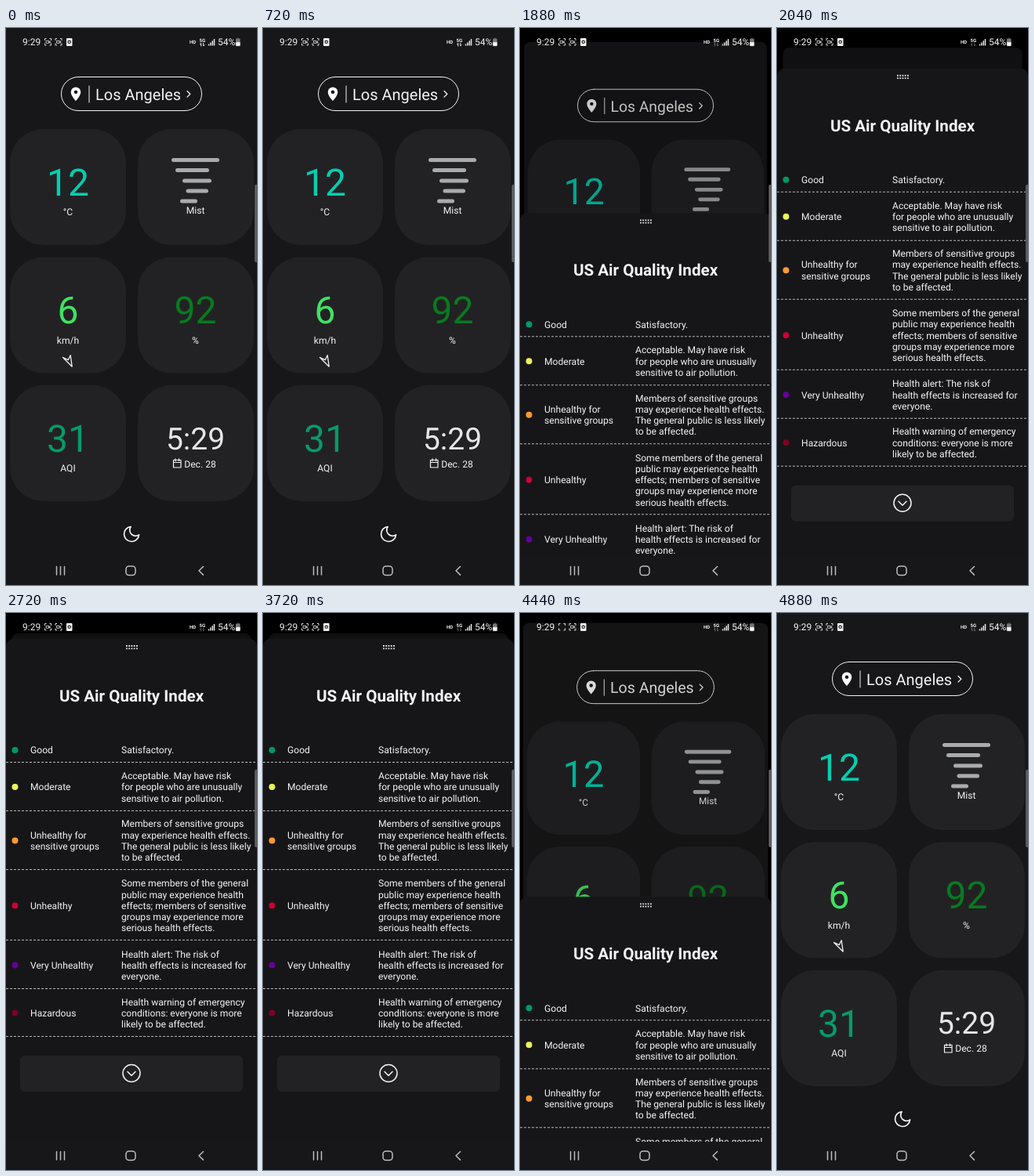
Animation of 320 by 711 pixels, one loop 5080 ms. Source, as an HTML page:

```html
<!DOCTYPE html>
<html lang="en">
<head>
<meta charset="utf-8">
<title>Weather tiles</title>
<style>
  html, body { margin: 0; width: 100%; height: 100%; overflow: hidden; background: #000; }
  svg { display: block; width: 100vw; height: 100vh; }
  text { font-family: Roboto, sans-serif; font-size: 12.1px; fill: #f4f4f4; text-rendering: geometricPrecision; }
  .mid { text-anchor: middle; }
  .big { font-size: 48px; }
  .line { fill: none; stroke: #f4f4f4; stroke-linecap: round; stroke-linejoin: round; }
  .tile { fill: #222224; }
</style>
</head>
<body>
<svg viewBox="0 0 320 711" preserveAspectRatio="none">
  <defs>
    <clipPath id="screen"><rect width="320" height="675"/></clipPath>
    <radialGradient id="glow">
      <stop offset="0" stop-color="#fff" stop-opacity=".62"/>
      <stop offset=".3" stop-color="#ddd" stop-opacity=".42"/>
      <stop offset=".85" stop-color="#ccc" stop-opacity=".36"/>
      <stop offset="1" stop-color="#ccc" stop-opacity="0"/>
    </radialGradient>
  </defs>
  <rect width="320" height="711" fill="#000"/>

  <g clip-path="url(#screen)">
    <g id="home">
      <rect id="page" width="320" height="690" fill="#171719"/>
      <rect class="line" x="70.5" y="62.5" width="179" height="43" rx="21.5"/>
      <path d="M89 75.500a6.300 6.300 0 0 0-6.300 6.300c0 4.700 6.300 11.400 6.300 11.400s6.300-6.700 6.300-11.400a6.300 6.300 0 0 0-6.300-6.300zm0 4a2.300 2.300 0 1 1 0 4.600a2.300 2.300 0 1 1 0-4.600z" fill="#fff" fill-rule="evenodd"/>
      <path class="line" d="M106 74V95"/>
      <text x="114" y="92" style="font-size:20px">Los Angeles</text>
      <path class="line" d="M231 80.500l3.800 3.800-3.800 3.800" stroke-width="1.300"/>

      <g id="tiles"></g>
      <rect id="press" x="5" y="456" width="148" height="148" rx="43" fill="#fff"/>
      <g id="values"></g>

      <path class="line" id="mist" style="stroke:#a9abac" stroke-width="5"
        d="M213.500 168.500H269.500M218.500 181.500H256.500M227.500 195H259.500M232 208H255.500M224.500 221H241.500"/>
      <path class="line" d="M84.200 432.200L72.500 420.500 79.300 423.700 82.200 417.800z" stroke-width="1.300"/>
      <path class="line" d="M213.500 551.500h9.500v9.500h-9.500zM213.500 554.500h9.500M216 549.800v2.600M220.500 549.800v2.600" stroke-width="1.200"/>
      <path class="line" d="M21 12.790A9 9 0 1 1 11.210 3 7 7 0 0 0 21 12.790z" transform="translate(147.300 633.300) scale(1.060)" stroke-width="1.600"/>
      <rect id="shade" width="320" height="690" fill="#000"/>
    </g>

    <g id="sheet">
      <rect width="320" height="700" rx="9" fill="#161618"/>
      <path d="M153 9H168M153 12.300H168" stroke="#e4e4e4" stroke-width="1.800" stroke-dasharray="1.800 1.450"/>
      <text class="mid" x="160" y="80" style="font-size:20.600px;font-weight:700">US Air Quality Index</text>
      <g id="rows"></g>
      <rect class="tile" x="18" y="532" width="284" height="46" rx="6"/>
      <circle class="line" cx="160" cy="554.500" r="11" stroke-width="1.500"/>
      <path class="line" d="M155 552.500l5 5 5-5" stroke-width="1.500"/>
    </g>
  </g>

  <rect y="675" width="320" height="36" fill="#171719"/>
  <g class="line" style="stroke:#bdbdbf" stroke-width="1.500">
    <path d="M64.500 687.500V698M69.500 687.500V698M74.500 687.500V698M251.500 687.500l-5.500 5.300 5.500 5.300"/>
    <rect x="153" y="687" width="12" height="11.500" rx="3.800"/>
  </g>
  <path d="M320 200h-1.500q-1.500 0-1.500 2v95q0 2 1.500 2h1.500z" fill="#5c5c5e"/>

  <g id="status">
    <text x="21" y="21.500" style="font-size:12px">9:29</text>
    <g class="line" style="stroke:#d8d8d8">
      <path id="frames" d="M49.500 16v-2.500h2M55.500 13.500h2v2.500M57.500 19.500v2.500h-2M51.500 22h-2v-2.500M63 16v-2.500h2M69 13.500h2v2.500M71 19.500v2.500h-2M65 22h-2v-2.500" stroke-linecap="butt"/>
      <path id="cam" d="M51.500 16.300h3v3h-3zM55 17.800l1.200-1v2z" stroke-width=".9"/>
      <path d="M65 16.300h3v3h-3zM68.500 17.800l1.200-1v2z" stroke-width=".9"/>
    </g>
    <rect x="77" y="13" width="7.500" height="10" rx="1" fill="#f4f4f4"/>
    <circle cx="80.700" cy="17.800" r="1.700" fill="none" stroke="#222" stroke-width="1.200"/>
    <text x="234" y="20" style="font-size:6px;font-weight:700">HD</text>
    <text x="246.500" y="17.500" style="font-size:6px;font-weight:700">5G</text>
    <path id="data" class="line" d="M248.700 23v-3.500l-1.200 1.200M251.700 19.500v3.500l1.200-1.200"/>
    <path d="M258.500 22.500v-2M260.900 22.500v-4M263.300 22.500v-6.300M265.500 22.500v-8.500" stroke="#e8e8e8" stroke-width="1.500"/>
    <text x="270" y="21.500" style="font-size:12px">54%</text>
    <rect x="293" y="13.500" width="5.500" height="9.500" rx="1" fill="#77777a"/>
    <path d="M294.500 13h2.500M293 18h5.500v4q0 1-1 1h-3.500q-1 0-1-1z" fill="#f4f4f4" stroke="#999" stroke-width=".4"/>
  </g>
  <circle id="touch" r="9" fill="url(#glow)"/>
</svg>

<script>
const LOOP = 5080;
const OPEN = 1756, CLOSE = 4350;
const SHEET_TOP = 33, SCREEN_H = 675;
const $ = id => document.getElementById(id);

function add(parent, tag, attrs, content = '') {
  const el = document.createElementNS('http://www.w3.org/2000/svg', tag);
  for (const name in attrs) el.setAttribute(name, attrs[name]);
  el.textContent = content;
  parent.append(el);
}

for (const x of [5, 168])
  for (const y of [129, 292.5, 456])
    add($('tiles'), 'rect', { class: 'tile', x, y, width: 148, height: 148, rx: 43 });

const values = [
  ['12', 79, 214, '#00d0b1'],
  ['6', 79, 377, '#40e262'],
  ['92', 241.5, 377, '#087a20'],
  ['31', 79, 541, '#069b67'],
];
for (const [txt, x, y, fill] of values)
  add($('values'), 'text', { class: 'big mid', x, y, style: `fill:${fill}` }, txt);
add($('values'), 'text', { class: 'mid', x: 241.5, y: 537.5, style: 'font-size:39px;fill:#e6e6e6' }, '5:29');

const labels = [
  ['°C', 79, 239], ['Mist', 241.5, 237], ['km/h', 79, 402.5],
  ['%', 241.5, 402.5], ['AQI', 79, 566], ['Dec. 28', 247.5, 560.5],
];
for (const [txt, x, y] of labels) add($('values'), 'text', { class: 'mid', x, y }, txt);

// middle of row, rule below it, dot colour, level, description
const levels = [
  [142, 157.5, '#009966', 'Good', 'Satisfactory.'],
  [189, 219.5, '#e8f55c', 'Moderate', 'Acceptable. May have risk|for people who are unusually|sensitive to air pollution.'],
  [257.5, 294.5, '#ff9933', 'Unhealthy for|sensitive groups', 'Members of sensitive groups|may experience health effects.|The general public is less likely|to be affected.'],
  [340.5, 384.5, '#cc0033', 'Unhealthy', 'Some members of the general|public may experience health|effects; members of sensitive|groups may experience more|serious health effects.'],
  [416.5, 446.5, '#660099', 'Very Unhealthy', 'Health alert: The risk of|health effects is increased for|everyone.'],
  [477.5, 507.5, '#7e0023', 'Hazardous', 'Health warning of emergency|conditions: everyone is more|likely to be affected.'],
];

function paragraph(x, mid, txt) {
  const lines = txt.split('|');
  lines.forEach((line, i) =>
    add($('rows'), 'text', { x, y: mid + 4.3 + (i - (lines.length - 1) / 2) * 14.25 }, line));
}

for (const [mid, rule, fill, level, info] of levels) {
  add($('rows'), 'circle', { cx: 11.5, cy: mid, r: 4, fill });
  paragraph(31, mid, level);
  paragraph(147, mid, info);
  add($('rows'), 'path', { d: `M0 ${rule}H320`, stroke: '#b8b8ba', 'stroke-dasharray': '3 2' });
}

const ramp = (t, from, to) => Math.min(1, Math.max(0, (t - from) / (to - from)));

// Critically damped spring from 0 to 1
function spring(ms) {
  const x = Math.max(0, ms) * 0.0189;
  return x > 11 ? 1 : 1 - (1 + x) * Math.exp(-x);
}

function tap(t) {
  if (t >= 1440 && t < 1720) return [93.5, 527.5, 1];
  if (t >= 4120 && t < 4360) return [174, 581, 0.75];
  return [0, 0, 0];
}

function draw(t) {
  const p = spring(t - OPEN) - spring(t - CLOSE);
  const scale = 1 - 0.0487 * p, mid = SCREEN_H / 2;
  $('home').setAttribute('transform',
    `translate(160 ${mid + 9.6 * p}) scale(${scale}) translate(-160 ${-mid})`);
  $('page').setAttribute('rx', Math.min(8, p * 40));
  $('shade').setAttribute('opacity', 0.3 * p);
  $('sheet').setAttribute('transform', `translate(0 ${SCREEN_H - (SCREEN_H - SHEET_TOP) * p})`);
  $('sheet').setAttribute('visibility', p > 0.0005 ? 'visible' : 'hidden');
  $('press').setAttribute('opacity', 0.18 * (ramp(t, 1480, 1640) - ramp(t, 1720, 1920)));

  const [x, y, alpha] = tap(t);
  $('touch').setAttribute('transform', `translate(${x} ${y})`);
  $('touch').setAttribute('opacity', alpha);

  // Recording icon blinks once a second
  const beat = (t + 300) % 1000;
  $('cam').setAttribute('opacity', 1 - ramp(beat, 420, 540));
  $('data').setAttribute('opacity', t < 40 || (t >= 720 && t < 1160) ? 1 : 0.4);
}

const start = performance.now();
function tick() {
  draw((performance.now() - start) % LOOP);
  requestAnimationFrame(tick);
}
tick();
</script>
</body>
</html>
```
